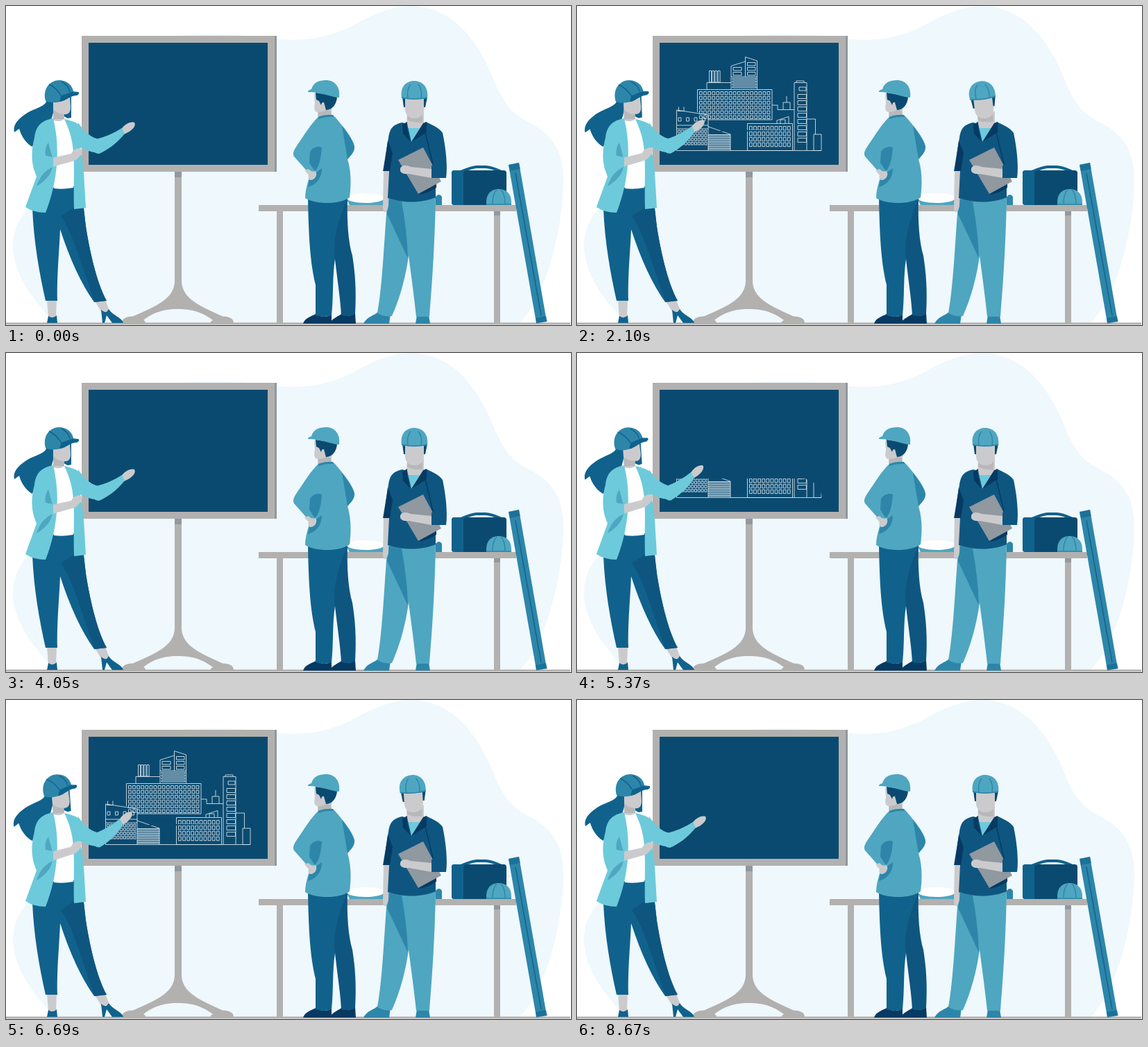
An HTML page for the animation above (9000 ms loop, 814 px wide and 460 px high).

```html
<!DOCTYPE html>
<html lang="en">
<head>
<meta charset="utf-8">
<title>Blueprint lesson</title>
<style>
html, body { margin: 0; width: 100%; height: 100%; overflow: hidden; background: #fff; }
svg { display: block; width: 100vw; height: 100vh; }
.pale { fill: #eff8fc; }
.grey { fill: #b2b1b0; }
.steel { fill: #9098a0; }
.skin { fill: #cbcbcd; }
.shade { fill: #b8b8bb; }
.navy { fill: #063a63; }
.board { fill: #0b4a70; }
.deep { fill: #0e5680; }
.blue { fill: #10628c; }
.teal { fill: #2d86a9; }
.mid { fill: #4fa6c0; }
.aqua { fill: #6dcadb; }
.white { fill: #fff; }
.line { fill: none; stroke-width: 1.4; }
</style>
</head>
<body>
<svg viewBox="0 0 814 460">
<defs>
  <mask id="wipe" maskUnits="userSpaceOnUse" x="0" y="0" width="814" height="460">
    <path id="brush" fill="none" stroke="#fff" stroke-width="60" stroke-linecap="round" stroke-linejoin="round"
      d="M80 211H370C398 205 398 164 370 158Q258 140 105 158C75 150 75 102 105 95H445"/>
  </mask>
</defs>

<path class="pale" d="M68 458C58 440 28 415 15 375C5 345 10 315 32 292C55 270 85 262 108 225C140 130 150 48 260 42C310 39 350 42 391 48C432 51 465 46 500 28C535 8 560 0 586 0C640 2 674 42 698 95C712 130 722 152 752 167C792 187 804 215 803 258C800 335 776 420 739 458Z"/>
<path class="grey" d="M0 456.5H813V459.5H0Z"/>

<g id="stand">
  <path class="grey" d="M243 239H253V398C255 420 272 430 312 447.500C323 448 328 451 328 457.500H294Q295 454 298 453C280 439 263 437 248 437C233 437 216 439 198 453Q201 454 201 457.500H167C167 451 172 448 183 447.500C224 430 241 420 243 398Z"/>
  <path class="steel" d="M243 239H253V247H243Z"/>
  <path class="grey" d="M109 43H390V239H109Z"/>
  <path class="steel" d="M387 43H390V239H387Z"/>
  <path class="board" d="M119 53H377V229H119Z"/>
</g>
<g mask="url(#wipe)">
  <path id="plan" fill="none" stroke="#dce9f0" stroke-width=".85"/>
</g>

<g id="table">
  <path class="mid" d="M491 279H546V287H495Z"/>
  <ellipse class="white" cx="518" cy="277" rx="27" ry="7"/>
  <path class="teal" d="M619 287V275Q624 269 628 275V287Z"/>
  <path class="line" style="stroke-width:4;stroke:#10628c" d="M655 239C665 235 673 232 678 232H691C697 232 705 235 714 239"/>
  <rect class="board" x="642" y="237" width="79" height="50" rx="4"/>
  <path class="blue" d="M646 237H664Q659 237 659 242V287H646Q642 287 642 283V241Q642 237 646 237Z"/>
  <path class="mid" d="M692 288V283C692 269 701 264 710 264C720 264 728 270 728 283V288Z"/>
  <path class="line" stroke="#2d86a9" d="M701 285C701 275 703 269 707 265M719 285C719 275 717 269 713 265M692 286H728"/>
  <path class="grey" d="M364 287H735V296H712V457H703V296H399V457H390V296H364Z"/>
  <path class="steel" d="M703 296H712V302H703Z"/>
  <path class="teal" d="M724 229L739 226L779 455L764 457Z"/>
  <path class="blue" style="opacity:.55" d="M724 229L739 226L741 235L726 238Z M763 450L778 447L780 455L764 458Z"/>
  <path class="line" stroke="#10628c" d="M734 241L771 446"/>
</g>

<g id="listener">
  <path class="navy" d="M428 458C431 449 440 448 446 444C455 449 462 449 469 445V458ZM466 458C471 449 479 448 483 444C492 448 498 447 503 443L504 458Z"/>
  <path class="blue" d="M435 277C436 330 438 370 446 402V446Q459 450 469 446C472 420 470 390 474 365L492 277Z"/>
  <path class="deep" d="M492 277C478 310 470 340 474 365C478 400 482 425 483 446Q494 449 503 444C505 410 503 385 499 360C493 340 491 310 492 277Z"/>
  <path class="skin" d="M444 126L478 130L469 150V161H449V153C443 152 444 146 445 140Z"/>
  <path class="shade" d="M450 153Q458 153 463 149L468 152V161H450Z"/>
  <path class="board" d="M446 125L477 130C477 141 470 150 461 150L458 139Q455 138 454 143L451 137L447 135Z"/>
  <path class="mid" d="M435 124Q434 122 440 120C443 110 451 107 461 107C474 107 482 117 480 132C470 132 454 124 435 124Z"/>
  <path class="mid" d="M450 160C458 157 468 156 474 160C486 174 499 189 502 202C503 211 496 216 492 221C498 240 497 260 495 276C480 287 445 286 431 277C431 263 436 252 438 243L415 217C412 212 416 206 420 200C429 187 439 170 450 160Z"/>
  <path class="teal" d="M450 160Q460 156 471 157L473 160Q461 159 450 163ZM484 173C494 186 502 198 502 204C501 212 496 216 492 221ZM438 210C443 203 450 202 455 204C454 220 451 232 445 238L437 226ZM455 234C455 248 447 258 435 261L438 246Z"/>
  <path class="skin" d="M430 237L436 235Q440 240 446 238C450 244 444 252 438 251Q434 249 436 244Z"/>
</g>

<g id="holder">
  <path class="teal" d="M515 458C521 447 530 447 536 441C544 448 550 448 554 444L552 458ZM590 458L592 446H609L611 458Z"/>
  <path class="mid" d="M550 274C545 330 543 400 535 443Q547 449 556 447C568 420 576 390 580 360C584 390 588 420 591 448H610C614 400 618 340 619 274Z"/>
  <path class="teal" d="M549 300L579 364Q578 325 570 282L551 278Z"/>
  <path class="skin" d="M544 236H553L551 288C549 300 543 300 543 290ZM578 152H602V172L588 184L577 176Z"/>
  <path class="aqua" d="M577 176H598L584 198Z"/>
  <path class="deep" d="M571 168C557 171 553 177 551 190L543 238H552L550 277C575 285 600 284 619 276V248H634C637 226 632 197 629 183C624 175 612 171 605 167L584 196L578 170Z"/>
  <path class="navy" d="M550 194L544 238H553L557 212ZM571 171L578 167V178L583 196L572 184ZM606 167L601 169L584 196L606 182ZM594 272L620 248V262Q606 271 594 272Z"/>
  <path class="line" stroke="#063a63" d="M604 182L616 232"/>
  <path class="steel" d="M565 222L601 204L627 253L594 271Z"/>
  <path class="skin" d="M568 235C569 229 577 229 583 232L613 235V248L580 242C572 243 567 240 568 235Z"/>
  <path class="deep" d="M613 230L634 228V248H613Z"/>
  <g id="holderHead">
    <path class="shade" d="M578 156H600V168Q586 169 578 164Z"/>
    <path class="board" d="M571 131H607L604 146H573Z"/>
    <path class="skin" d="M575 134H602V150C601 160 594 162 588 162C581 162 576 158 575 150Z"/>
    <path class="mid" d="M570 133C567 115 578 108 588 108C600 108 609 117 607 133Q588 137 570 133Z"/>
    <path class="line" stroke="#2d86a9" d="M579 133Q577 120 583 113M598 133Q600 120 594 113M570 132Q588 136 607 132"/>
  </g>
</g>

<g id="teacher">
  <path id="hair" class="blue" d="M58 132C62 146 40 146 25 158C14 166 10 174 12 182L19 177C22 188 29 198 38 203C42 190 54 178 62 170C67 162 70 148 70 136Z"/>
  <path class="skin" d="M59 424H73L72 449H61ZM127 424H143L149 439L138 442Z"/>
  <path class="blue" d="M61 447Q68 452 73 446L74 457H59ZM137 438Q144 445 148 437C153 446 167 449 169 457H153L145 446L142 457H139Z"/>
  <path class="blue" d="M38 292C40 340 48 385 57 425H74C73 390 77 350 78 322C92 365 108 400 127 427L145 425C130 398 120 350 115 318L111 283L98 260H70Z"/>
  <path class="deep" d="M79 303C98 330 112 385 128 427L145 425C130 398 120 350 115 318L111 283L98 290Z"/>
  <path class="white" d="M67 163H85C97 180 100 200 97 262Q82 265 69 263Z"/>
  <path class="skin" d="M68 150H84V163Q78 168 68 165Z"/>
  <path class="aqua" d="M68 162C52 165 43 172 41 190C37 205 36 220 40 235L44 246L28 290Q40 298 57 298C70 265 81 215 68 162ZM84 163C96 166 105 168 110 177L107 203C109 220 112 230 112 240L115 291L98 293C97 262 99 235 97 212C96 192 91 178 84 163Z"/>
  <path class="mid" d="M61 197L67 219L57 216Q55 205 61 197ZM44 260Q50 240 67 232Q64 248 44 260Z"/>
  <g id="restingArm">
    <path class="skin" d="M66 219L94 213C97 206 106 203 110 207C110 213 105 219 99 223L67 232Z"/>
    <path class="aqua" d="M40 213L68 218V232Q52 238 40 235Z"/>
  </g>
  <g id="arm">
    <path class="aqua" d="M104 168C113 182 123 190 134 192L141 207Q132 217 105 203Z"/>
    <g id="forearm">
      <path class="skin" d="M166 178C170 171 179 166 185 168C188 172 182 179 176 182L170 185Z"/>
      <path class="aqua" d="M130 192Q150 187 167 176L171 184C160 198 146 208 134 213C124 213 122 202 130 192Z"/>
    </g>
  </g>
  <g id="teacherHead">
    <path class="blue" d="M60 132L94 130V161L89 162L66 150Z"/>
    <path class="skin" d="M68 137L92 130L93 146C93 154 89 157 84 156V163H68Z"/>
    <path class="shade" d="M68 149Q75 156 84 156V163H68Z"/>
    <path class="teal" d="M57 137C52 118 65 106 78 107C90 108 96 116 97 123L104 124Q107 126 102 129C92 129 86 137 78 138Q66 141 57 137Z"/>
    <path class="line" stroke="#10628c" d="M62 113Q72 117 80 130L97 124M80 109Q90 114 92 124"/>
    <path class="blue" d="M79 131Q88 125 104 124Q107 126 102 129C92 129 86 137 77 138Z"/>
  </g>
</g>
</svg>
<script>
const LOOP = 9000, BRUSH_LENGTH = 1076;
const el = id => document.getElementById(id);
const clamp = v => Math.min(1, Math.max(0, v));

const box = (x, y, w, h) => `M${x} ${y}h${w}v${h}h${-w}z`;
const grid = (x, y, cols, rows, dx, dy, w, h) => {
  let d = '';
  for (let r = 0; r < rows; r++)
    for (let c = 0; c < cols; c++) d += box(x + c * dx, y + r * dy, w, h);
  return d;
};

el('plan').setAttribute('d', [
  'M143.500 208.500H352M143.500 208.500V150L189 157V208.500M146.500 150V145.500M154 152V145.500M145 151.500H154.500M143.500 172H189M143.500 177H189',
  grid(146, 161, 4, 1, 11.5, 1, 4, 5), grid(145.5, 179, 9, 4, 4.8, 5.8, 3, 3.8),
  'M189 174L221 185V208.500', grid(189.5, 185.5, 1, 7, 1, 3.3, 31, 1.3),
  'M173.500 153V120.500H281V164H189', grid(176.5, 123.5, 17, 6, 6.1, 6.9, 3.8, 4.5),
  'M187 120.500V110.500H222', grid(190.5, 93.5, 4, 1, 4.2, 1, 3, 16.5),
  'M222 120V86.500L242.500 80V73.500L259.500 79V120M242.500 80V102M222 102H260',
  grid(225, 88.5, 1, 2, 1, 7, 12, 4.5), grid(245.5, 81.5, 1, 3, 1, 7, 11.5, 4.5),
  grid(224, 104, 1, 4, 1, 4, 34, 2),
  box(245.5, 169.5, 65, 39), grid(248.5, 173.5, 10, 4, 6.1, 7.9, 3.8, 5.5),
  'M288 169V165L305 159.500V169M293 169V164H300V169',
  'M281 143H289V149.500H313M297 149V139H307V149M302 139V130',
  'M313 208V110.500H331V208M316 110V108H327V110',
  grid(320, 117, 1, 1, 1, 1, 10, 5), grid(318, 127.5, 1, 8, 1, 9, 12.5, 6),
  'M331 163H343.500V185', box(341, 185, 11, 23.5)
].join(''));

// Raised-cosine sway: out and back once within the given span
const sway = (t, start, length) => (1 - Math.cos(2 * Math.PI * clamp((t - start) / length))) / 2;
const turn = (id, angle, x, y) => el(id).setAttribute('transform', `rotate(${angle} ${x} ${y})`);

function render(t) {
  const drawn = clamp((t - 390) / 1200) - clamp((t - 2910) / 1140)
    + clamp((t - 5100) / 1200) - clamp((t - 7530) / 1140);
  el('brush').setAttribute('stroke-dasharray', `${Math.max(0, drawn) * BRUSH_LENGTH} 3000`);

  const teach = sway(t, 150, 2310) + sway(t, 4890, 2310);
  turn('teacherHead', -10 * teach, 80, 165);
  turn('hair', -4 * teach, 45, 200);
  turn('arm', -2 * teach, 106, 184);
  turn('forearm', -15 * teach, 132, 203);
  turn('restingArm', -5 * teach, 60, 225);

  const nod = sway(t, 1200, 1800) + sway(t, 5370, 1800);
  turn('holderHead', -7 * nod, 588, 165);
}

function tick() {
  render(performance.now() % LOOP);
  requestAnimationFrame(tick);
}
tick();
</script>
</body>
</html>
```
